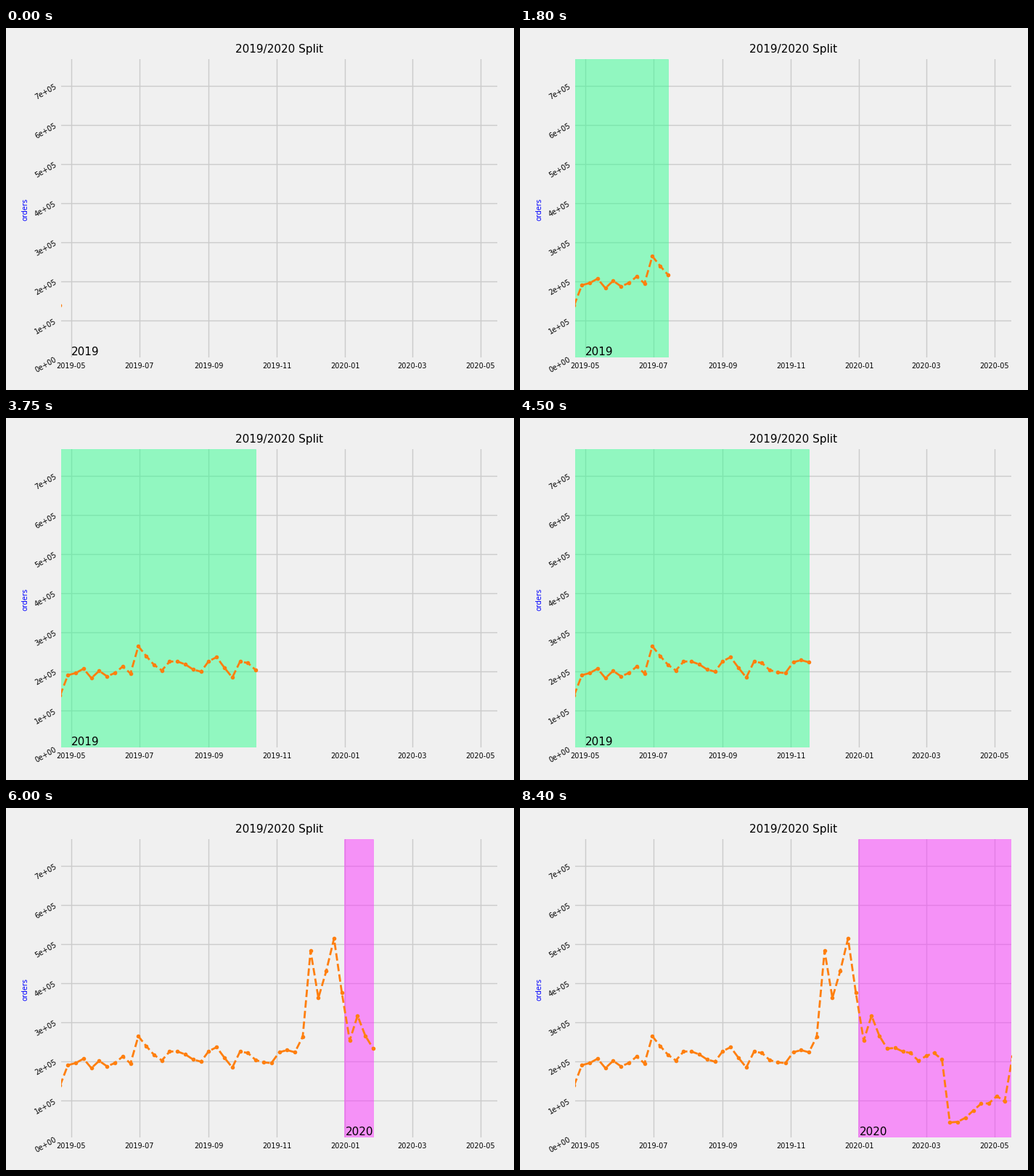
Recreate the animation shown at these times as a matplotlib script. Size 700 by 500 pixels, loop 8550 ms.

```python
import matplotlib.pyplot as plt
import numpy as np
from matplotlib.animation import FuncAnimation
from matplotlib.patches import Rectangle

W, H, DPI = 700, 500, 100
LEFT, RIGHT, TOP, BOTTOM = 76.02, 677.02, 43, 455
ZERO_Y, STEP_Y = 457.8, 54  # pixel row of zero, pixels per 100k orders

BACK, GRID, ORANGE = "#f0f0f0", "#cbcbcb", "#ff7f0e"
GREEN, PINK = "#33ff92", "#fa33ff"

# Weekly orders in thousands, starting on 2019-04-21
ORDERS = np.array([
    138, 190, 195.5, 206.5, 182.5, 201, 187, 195.5, 212, 194.5,
    264, 239, 216.5, 202, 225, 225, 217.5, 204.5, 199, 226,
    236, 209, 184, 225, 221, 203, 197, 195.5, 223, 228.5,
    223, 263, 482.5, 362, 430.5, 514, 375, 253, 316.5, 265,
    232.5, 234, 225, 221, 201, 214, 221, 204.5, 43.5, 45,
    55.5, 74, 91.5, 92.5, 111, 97, 212,
]) * 1e3
# Days are counted from 2019-05-01
DAYS = -10 + 7 * np.arange(len(ORDERS))
MONTHS = {0: "2019-05", 61: "2019-07", 123: "2019-09", 184: "2019-11",
          245: "2020-01", 305: "2020-03", 366: "2020-05"}
NEW_YEAR = 245


def orders_at(y):
    return (ZERO_Y - y) / STEP_Y * 1e5


plt.rcParams["font.family"] = "DejaVu Sans"
fig = plt.figure(figsize=(W / DPI, H / DPI), dpi=DPI, facecolor=BACK)
ax = fig.add_axes([LEFT / W, 1 - BOTTOM / H, (RIGHT - LEFT) / W, (BOTTOM - TOP) / H],
                  facecolor=BACK)
ax.set_xlim(-9, 381)
ax.set_ylim(orders_at(BOTTOM), orders_at(TOP))
ax.set_axisbelow(True)
ax.grid(color=GRID, linewidth=1)
for spine in ax.spines.values():
    spine.set_visible(False)

ticks = np.arange(1, 8) * 1e5
ax.set_xticks(list(MONTHS), list(MONTHS.values()))
ax.set_yticks(ticks, [f"{t:.0e}" for t in ticks])
ax.tick_params(length=0, labelsize=7)
ax.tick_params(axis="x", pad=5.4)
ax.tick_params(axis="y", pad=3.5, labelrotation=30)
ax.annotate("0e+00", (0, 0), xycoords="axes fraction", xytext=(-3.5, -1),
            textcoords="offset points", fontsize=7, rotation=30,
            ha="right", va="center_baseline")
ax.set_title("2019/2020 Split", fontsize=11, pad=6.6)
fig.text(26.7 / W, 0.5, "orders", fontsize=7, color="blue", rotation=90,
         ha="center", va="center")

span = ax.add_patch(Rectangle((DAYS[0], 0), 0, 1, alpha=0.5, linewidth=0.5,
                              transform=ax.get_xaxis_transform()))
line, = ax.plot([], [], "o--", color=ORANGE, linewidth=2, markersize=3)
year = ax.text(0, 1e4, "", fontsize=11)


def draw(i):
    today = DAYS[i]
    if today < NEW_YEAR:
        start, color, label, label_x = DAYS[0], GREEN, "2019", 0
    else:
        start, color, label, label_x = NEW_YEAR - 1, PINK, "2020", NEW_YEAR
    span.set_x(start)
    span.set_width(today - start)
    span.set_color(color)
    year.set_text(label)
    year.set_x(label_x)
    line.set_data(DAYS[:i + 1], ORDERS[:i + 1])
    return span, line, year


anim = FuncAnimation(fig, draw, frames=len(ORDERS), interval=150, repeat=True)
plt.show()
```
